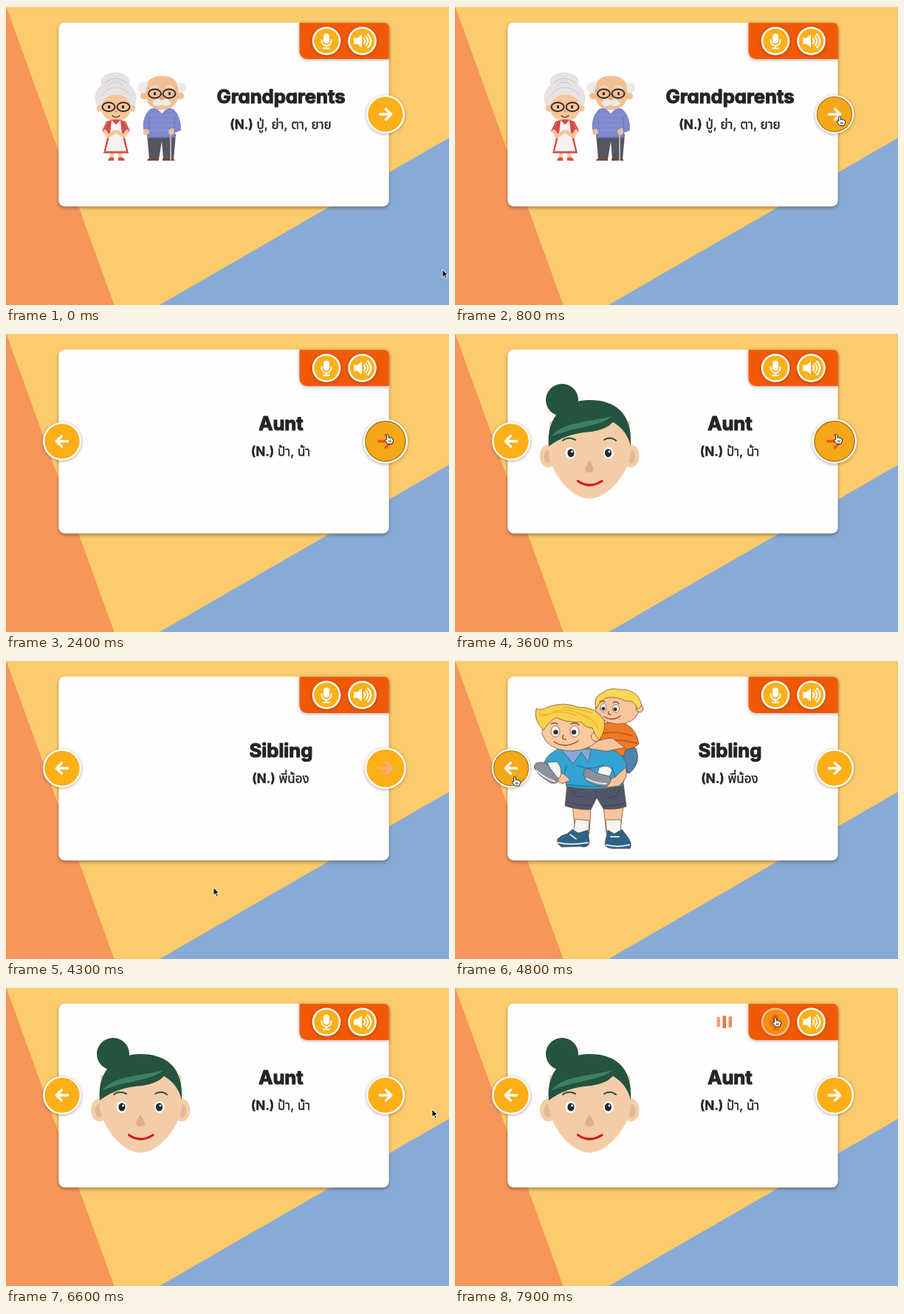
These frames come from a looping animation (600x406 px, 8000 ms). An HTML page:

```html
<!DOCTYPE html>
<html lang="en">
<head>
<meta charset="utf-8">
<title>Family flashcards</title>
<style>
html, body { margin: 0; width: 100%; height: 100%; overflow: hidden; background: #fccb6b; }
svg { display: block; width: 100%; height: 100%; }
text { fill: #262425; stroke: #262425; stroke-linejoin: round; text-anchor: middle; }
.word { font: 700 25.6px Inter, sans-serif; font-feature-settings: "cv11"; stroke-width: 1.2; }
.note { font: 400 17px Inter, "Noto Sans Thai", "Noto Sans", sans-serif; stroke-width: .4; }
.note tspan { font-weight: 700; }
.line { fill: none; stroke-linecap: round; stroke-linejoin: round; }
.card { filter: drop-shadow(0 2px 2px rgba(60, 40, 20, .5)); }
.lift { filter: drop-shadow(0 1px 2px rgba(60, 40, 20, .4)); }
</style>
</head>
<body>
<svg viewBox="0 0 600 406" preserveAspectRatio="none">
  <path fill="#fccb6b" d="M0 0H600V406H0z"/>
  <path fill="#f6965a" d="M0 0L146.500 406H0z"/>
  <path fill="#88aad7" d="M600 179V406H208z"/>
  <path fill="#f1f3f4" d="M0 0H600V1.300H0z"/>
  <rect class="card" x="71.300" y="22.500" width="447.400" height="249.700" rx="8" fill="#fffdfe"/>
  <path class="lift" fill="#f25905" d="M397.500 22.800H511Q518.700 22.800 518.700 30.500V72H409.500Q397.500 72 397.500 60z"/>

  <g id="grandparents">
    <g stroke="#d8d4d2" stroke-width=".6" fill="#e6e4e3">
      <ellipse cx="148" cy="103" rx="19" ry="12.500"/>
      <ellipse cx="148.500" cy="125" rx="27.500" ry="24"/>
    </g>
    <path class="line" stroke="#c9c6c5" d="M134 104Q148 92 163 104M138 108Q148 98 158 108M129 122Q138 110 148 111Q160 110 169 122"/>
    <g fill="#f8c59b">
      <circle cx="127" cy="139" r="4.500"/><circle cx="171" cy="139" r="4.500"/>
      <path d="M129 135Q134 121 149 120Q165 121 169 135Q170 155 149 156Q128 155 129 135z"/>
      <path d="M141 196h5v13h-5zM152 196h5v13h-5z"/>
    </g>
    <path fill="#d24b48" d="M136 157Q149 151 162 157L168 170L160 174L166 200H132L138 174L130 170z"/>
    <path fill="#f8f1f0" d="M143 155L149 161L155 155L157 173L163 197H135L141 173z"/>
    <path class="line" stroke="#f8c59b" stroke-width="5" d="M134 170L138 177L147 171M164 170L160 177L151 171"/>
    <path class="line" stroke="#ec9c95" stroke-dasharray="1 2" d="M137 159L134 168M161 159L164 168M134 198H164"/>
    <path fill="#d84f4c" d="M138 210Q139 204 146 206V210zM152 210V206Q160 204 161 210z"/>
    <g class="line" stroke="#392c2b" stroke-width="2">
      <ellipse cx="139" cy="137" rx="8.500" ry="6"/><ellipse cx="159" cy="137" rx="8.500" ry="6"/>
      <path stroke-width="1.200" d="M144 149Q149 153 154 149"/>
    </g>
    <path fill="#332a2a" d="M138 135h3v4h-3zM157 135h3v4h-3z"/>
    <path class="line" stroke="#e79777" stroke-width="2" d="M148 143h2"/>

    <path fill="#55565f" d="M191 174H230L227 208H213L211 184L207 208H194z"/>
    <path fill="#704b38" d="M191 210Q193 204 207 207V210zM212 210V207Q225 204 229 210z"/>
    <path fill="#7e89ce" d="M195 140Q211 133 227 140Q238 151 237 169L229 172V179H192V172L186 168Q184 151 195 140z"/>
    <path class="line" stroke="#a2aae0" stroke-dasharray="1 3" d="M194 148H228M192 155H230M192 162H230M193 169H229"/>
    <path class="line" stroke="#6670b6" d="M194 152L193 178H228V152"/>
    <path fill="#f5f5f8" d="M202 137L211 146L220 137L216 134H206z"/>
    <path class="line" stroke="#b8b9bf" stroke-width="2" d="M223 209V169Q223 166 227 167"/>
    <g fill="#f2be92">
      <circle cx="224" cy="171" r="4"/><circle cx="190" cy="171" r="4"/>
      <circle cx="187" cy="122" r="5"/><circle cx="236" cy="122" r="5"/>
      <path d="M189 116Q189 95 211 95Q234 95 234 116Q234 140 211 141Q189 140 189 116z"/>
    </g>
    <g fill="#eceae9">
      <path d="M192 104Q180 101 178 111Q179 119 189 118zM231 104Q243 102 244 111Q243 119 234 118z"/>
      <path d="M211 126Q218 124 224 132Q218 139 211 134Q203 139 198 132Q204 124 211 126z"/>
    </g>
    <path class="line" stroke="#dfdddc" stroke-width="2.500" d="M197 111Q201 107 206 110M217 110Q222 107 226 111"/>
    <g class="line" stroke="#392c2b" stroke-width="2">
      <ellipse cx="201.500" cy="119" rx="8.500" ry="6"/><ellipse cx="221" cy="119" rx="8.500" ry="6"/>
    </g>
    <path fill="#332a2a" d="M200 117h3v4h-3zM220 117h3v4h-3z"/>
    <circle cx="211" cy="125" r="3" fill="#e7a477"/>
  </g>

  <g id="aunt">
    <g fill="#f4cda8">
      <ellipse cx="126.500" cy="167" rx="11.500" ry="15.500"/><ellipse cx="238" cy="167" rx="11.500" ry="15.500"/>
    </g>
    <g fill="#e5b88f">
      <ellipse cx="126" cy="168" rx="5.500" ry="9"/><ellipse cx="239" cy="168" rx="5.500" ry="9"/>
    </g>
    <path fill="#f4cda8" d="M128 120H237L238 164C234 192 206 225 182 225C158 225 131 192 127 164z"/>
    <circle cx="145" cy="91" r="22" fill="#24533f"/>
    <path fill="#24533f" d="M127 154C123 112 150 91 182 91C216 91 241 108 238 154Q233 132 214 121Q205 131 185 134Q150 136 127 154z"/>
    <path fill="#3d8160" d="M130 141C148 119 180 122 213 113C196 128 160 127 130 141z"/>
    <path class="line" stroke="#24533f" stroke-width="2" d="M146 146Q153 140 163 145M202 145Q211 140 218 146"/>
    <g fill="#fff"><ellipse cx="156.500" cy="163" rx="7" ry="8"/><ellipse cx="208" cy="163" rx="7" ry="8"/></g>
    <g fill="#1c2b33"><ellipse cx="157" cy="163" rx="4.600" ry="5.500"/><ellipse cx="207.500" cy="163" rx="4.600" ry="5.500"/></g>
    <g fill="#fff"><circle cx="158.500" cy="161" r="1.500"/><circle cx="209" cy="161" r="1.500"/></g>
    <path fill="#e0ae84" d="M182 173Q189 184 188 187Q182 192 176 187Q175 184 182 173z"/>
    <path class="line" stroke="#d9161c" stroke-width="3.200" d="M166.500 201Q182 212 199 201"/>
  </g>

  <g id="sibling" stroke="#60432f" stroke-width=".7" stroke-linejoin="round">
    <path fill="#4d82ad" d="M222 112L245 120Q253 140 236 154L218 149z"/>
    <path fill="#ed7b25" d="M188 92Q210 79 232 87Q246 95 249 114Q240 122 231 121L229 130L196 129L188 111z"/>
    <path class="line" stroke="#c65b17" stroke-width="2" d="M193 102Q214 94 240 103M192 112Q214 105 246 113"/>
    <path fill="#f8c59c" d="M198 49Q222 40 243 53Q253 61 249 70Q243 87 220 87Q194 85 190 67z"/>
    <circle cx="250" cy="66" r="5" fill="#f8c59c"/>
    <path fill="#fbd755" d="M191 66Q186 49 201 44Q209 37 222 40Q248 39 253 62L247 67Q243 53 232 56Q217 48 203 52Q197 56 191 66z"/>
    <path class="line" stroke="#8f4a2f" stroke-width="1.300" d="M202 77Q213 84 224 76M196 57Q200 54 203 57M214 58Q218 55 222 59M208 70Q206 74 211 74"/>
    <g fill="#fff"><ellipse cx="201" cy="65" rx="4" ry="5.500"/><ellipse cx="218" cy="66" rx="4.500" ry="5.500"/></g>
    <g fill="#332b2d"><circle cx="201" cy="66" r="2.300"/><circle cx="217" cy="67" r="2.300"/></g>

    <path fill="#f8c59c" d="M159 195L184 199L182 236H163zM201 199H228L223 235H205z"/>
    <path fill="#f4f4f2" d="M163 216L182 218L180 239L160 237zM204 217H225L224 238H206z"/>
    <path fill="#2e6388" d="M159 230L167 235L180 231L182 248Q180 256 169 253L145 254Q137 250 139 243Q145 237 152 236zM207 231L216 236L226 230L233 239Q241 249 237 256H213Q203 255 203 249z"/>
    <path class="line" stroke="#d9e4ea" stroke-width="2" d="M140 248Q155 252 180 248M205 251Q220 255 236 251M156 237L164 243M211 240L222 240"/>
    <path fill="#505768" d="M152 168H228L232 199Q217 204 201 202L192 187L184 203Q166 204 149 198z"/>
    <path class="line" stroke="#333947" d="M151 193Q168 198 184 198M201 198Q216 199 231 194M191 174V188M159 176Q160 187 174 186M222 177Q221 188 206 187"/>
    <path fill="#33a3d2" d="M139 121Q171 113 210 121Q232 128 233 148L227 171Q190 179 151 172L148 156L122 151Q115 134 139 121z"/>
    <path class="line" stroke="#1d789f" stroke-width="1.300" d="M148 156L151 143M217 160L213 146M151 169Q190 175 227 168M165 143Q184 151 201 142"/>
    <path fill="#83a9dc" d="M142 119L160 141L171 125L181 139L184 121z"/>
    <path fill="#f8c59c" d="M123 145L148 155L156 163L146 168L117 155zM231 146Q236 160 222 171L206 173L204 165L217 159zM180 120Q190 107 213 106L230 119L205 124z"/>
    <path fill="#f3f3f2" d="M125 139L138 138Q147 148 142 160L134 161zM195 146Q207 141 213 149L207 165L190 165z"/>
    <path fill="#8b929d" d="M110 140Q124 136 129 147L140 162Q140 169 130 167Q108 154 107 144zM175 149Q182 145 190 153L210 158Q214 169 202 172Q178 169 174 157z"/>
    <path class="line" stroke="#e7e9ed" stroke-width="2" d="M110 150Q121 160 135 165M178 161Q190 168 205 168"/>

    <path fill="#f9c99f" d="M119 81Q130 72 158 76Q185 71 194 88Q197 107 187 115Q172 125 150 123Q125 120 118 101z"/>
    <circle cx="191" cy="104" r="6.500" fill="#f9c99f"/>
    <path fill="#fbd14b" d="M120 95Q106 83 110 66Q118 69 125 64Q147 56 167 64Q191 63 202 82Q205 96 195 109Q189 101 186 92Q177 93 171 84Q152 86 137 78Q127 84 120 95z"/>
    <path class="line" stroke="#d29a22" d="M118 77Q141 65 164 75M132 70Q158 62 181 80M174 74Q189 80 194 94M114 72Q118 77 124 73M146 64Q168 66 186 72"/>
    <g fill="#fff"><ellipse cx="136" cy="97" rx="6" ry="7.500"/><ellipse cx="162" cy="97" rx="6" ry="7.500"/></g>
    <g fill="#332b2d"><circle cx="136.500" cy="98" r="3"/><circle cx="161" cy="98" r="3"/></g>
    <path class="line" stroke="#8f4a2f" stroke-width="1.400" d="M130 87Q135 84 139 87M157 87Q163 84 168 88M147 102Q143 107 150 108M134 111Q149 121 167 110"/>
  </g>

  <text class="word" id="word" x="372.500" y="132"></text>
  <text class="note" x="372" y="167"><tspan>(N.)</tspan> <tspan id="note" style="font-weight:400"></tspan></text>
  <g id="bars" fill="#e9763a"></g>

  <g id="mic">
    <circle class="lift" cx="434" cy="47.500" r="19.300" fill="#fff"/>
    <circle cx="434" cy="47.500" r="16.800" fill="#fdb018"/>
    <g id="micIcon">
      <rect x="430" y="37.500" width="8" height="13.500" rx="4"/>
      <path class="line" stroke="currentColor" stroke-width="1.900" d="M427.500 46v1.500a6.500 6.500 0 0 0 13 0V46M434 54v3.500M430 57.500h8"/>
    </g>
  </g>
  <circle class="lift" cx="482.500" cy="47.500" r="19.300" fill="#fff"/>
  <circle cx="482.500" cy="47.500" r="16.800" fill="#fdb018"/>
  <path fill="#fff" d="M471 43.500h5l6-5v18l-6-5h-5z"/>
  <path class="line" stroke="#fff" stroke-width="2.200" d="M485 44.500q2.500 3 0 6M487.500 41.500q5.500 6 0 12M490 38.500q8.500 9 0 18"/>

  <g id="prev"></g>
  <g id="next"></g>

  <g id="arrow"><path fill="#111" stroke="#fff" stroke-width=".9" d="M0 0V10.500L2.500 8.300L4.300 12.300L6.200 11.400L4.400 7.600H7.700z"/></g>
  <g id="hand"><path fill="#fff" stroke="#222" stroke-width="1" stroke-linejoin="round" d="M-1.300 7V1Q0-1 1.300 1V5Q3 3.600 4 5.200Q5.500 4.300 6 6Q7.500 5.600 7.500 7.500V9L6 13H0L-3.600 8.500Q-3.700 6.300-1.300 7zM1.800 8V11M4 8V11"/></g>
</svg>
<script>
const LOOP = 8000;
const $ = id => document.getElementById(id);

const words = {
  grandparents: ["Grandparents", "ปู่, ย่า, ตา, ยาย"],
  aunt: ["Aunt", "ป้า, น้า"],
  sibling: ["Sibling", "พี่น้อง"]
};
// page, opens at, picture appears at
const pages = [
  ["grandparents", 0, 0],
  ["aunt", 1000, 2800],
  ["sibling", 3800, 4800],
  ["aunt", 5700, 6000]
];
// time, x, y
const mouse = [
  [0, 591, 358], [200, 591, 358], [900, 517, 137.5], [3950, 517, 137.5],
  [4300, 281, 309], [4800, 81, 158], [5700, 81, 158], [6300, 577, 166],
  [7050, 577, 166], [7500, 434, 41], [LOOP, 434, 41]
];
// time, hover amount
const hover = {
  next: [[0, 0], [750, 0], [1000, .6], [1001, 0], [1480, 0], [1900, 1], [4050, 1], [4550, 0]],
  prev: [[0, 0], [4750, 0], [5150, 1], [5800, 1], [6250, 0]],
  mic: [[0, 0], [7400, 0], [7750, 1]]
};

const clamp = v => Math.max(0, Math.min(1, v));
const ease = v => v * v * (3 - 2 * v);
const lerp = (a, b, k) => a + (b - a) * k;
const blend = k => `rgb(${lerp(255, 241, k)},${lerp(255, 88, k)},${lerp(255, 22, k)})`;
const show = (id, on) => $(id).style.display = on ? "" : "none";

function at(keys, t) {
  const i = keys.findIndex(k => k[0] > t);
  if (i < 0) return keys[keys.length - 1].slice(1);
  const a = keys[i - 1], b = keys[i];
  const k = ease((t - a[0]) / (b[0] - a[0]));
  return a.slice(1).map((v, j) => lerp(v, b[j + 1], k));
}

for (const id of ["prev", "next"]) {
  $(id).innerHTML = `
    <circle class="lift" r="26" fill="#fff"/>
    <circle r="23.700" fill="#fdaf18"/>
    <circle class="shade" r="23.400" fill="#a06a16" fill-opacity=".09" stroke="#80500c" stroke-opacity=".6" stroke-width="1.300"/>
    <path class="icon line" stroke-width="3.300" d="M-7.700 0H7.500M.500-7.200L7.700 0L.500 7.200"${id === "prev" ? ' transform="scale(-1 1)"' : ""}/>`;
}
$("bars").innerHTML = '<rect width="4.500"/>'.repeat(3);

function drawButton(id, x, size, over, amount) {
  const g = $(id);
  g.setAttribute("transform", `translate(${x} 147) scale(${size * (1 + amount * .16)})`);
  g.querySelector(".shade").style.display = over ? "" : "none";
  g.querySelector(".icon").style.stroke = blend(amount);
}

let current;
function drawPage(t) {
  const [name, , loaded] = pages.filter(p => p[1] <= t).pop();
  if (name !== current) {
    current = name;
    [$("word").textContent, $("note").textContent] = words[name];
  }
  for (const id in words) show(id, id === name && t >= loaded);
}

function drawBars(t) {
  show("bars", t >= 7700);
  [...$("bars").children].forEach((bar, i) => {
    const wave = Math.cos((t - 7900) / 130 - (i - 1) * 1.9 + .4);
    const h = 14.8 + 2.2 * wave;
    bar.setAttribute("x", 354.5 + i * 8);
    bar.setAttribute("y", 47.5 - h / 2);
    bar.setAttribute("height", h);
    bar.setAttribute("opacity", .8 + .2 * wave);
  });
}

function draw(t) {
  drawPage(t);
  drawBars(t);

  const [x, y] = at(mouse, t);
  const over = (cx, cy, r) => Math.hypot(x - cx, y - cy) < r;
  const onNext = over(514, 147, 27);
  const onPrev = t >= 1000 && over(76, 147, 27);
  const onTop = over(434, 47.5, 19) || over(482.5, 47.5, 19);
  const [micHover] = at(hover.mic, t);

  show("prev", t >= 1000);
  drawButton("prev", 76, ease(clamp((t - 950) / 250)), onPrev, at(hover.prev, t)[0]);
  drawButton("next", 514, 1, onNext, at(hover.next, t)[0]);

  $("mic").style.opacity = 1 - .4 * micHover;
  $("micIcon").style.fill = $("micIcon").style.color = blend(micHover);

  const hand = onNext || onPrev || onTop;
  show("hand", hand);
  show("arrow", !hand);
  $(hand ? "hand" : "arrow").setAttribute("transform", `translate(${x} ${y})`);
}

const start = performance.now();
function tick() {
  draw((performance.now() - start) % LOOP);
  requestAnimationFrame(tick);
}
tick();
</script>
</body>
</html>
```
